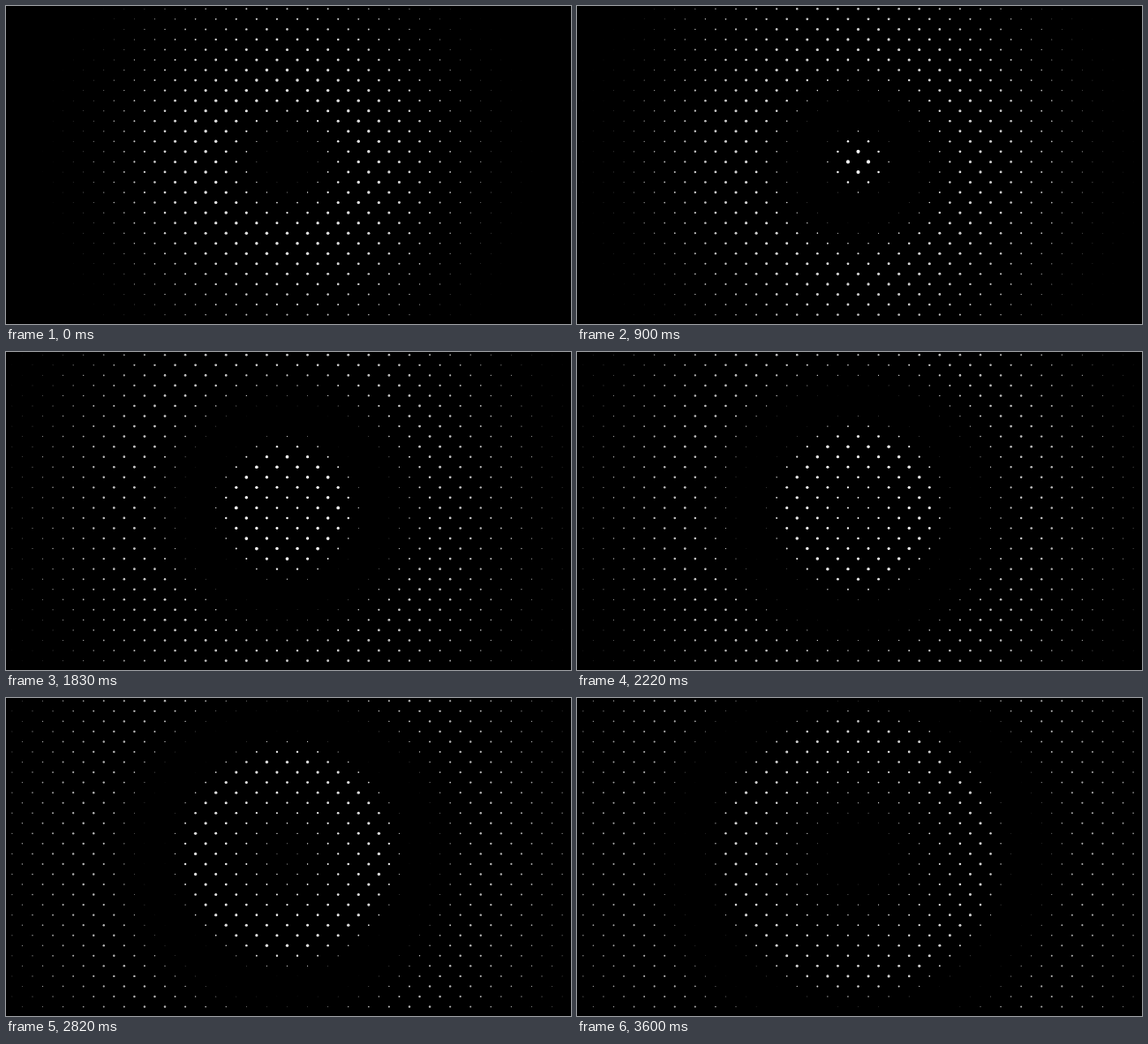
Write an HTML page with a canvas that moves like this. It is 640 by 360 pixels and loops after 3630 ms.

```html
<!DOCTYPE html>
<html lang="en">
<head>
<meta charset="utf-8">
<title>Dot ripple</title>
<style>
  html, body { margin: 0; width: 100%; height: 100%; overflow: hidden; background: #000; }
  canvas { display: block; }
</style>
</head>
<body>
<canvas id="stage" width="640" height="360"></canvas>
<script>
const ctx = document.getElementById('stage').getContext('2d');
const LOOP = 3630, STEP = 30;
const CX = 318.5, CY = 176.4, GAP = 11.54;
const COLS = 27, ROWS = 15;
const SPEED = 0.049; // px per ms

// Dots on a staggered lattice around the centre
const dots = [];
for (let j = -ROWS; j <= ROWS; j++) {
  for (let i = -COLS; i <= COLS; i++) {
    if ((i + j) % 2 === 0) continue;
    dots.push({ x: CX + i * GAP, y: CY + j * GAP, r: Math.hypot(i, j) * GAP });
  }
}

const line = (from, to, v) => Math.min(1, Math.max(0, (v - from) / (to - from)));
const smooth = x => x * x * (3 - 2 * x);

// Height of the two travelling rings at u, the distance relative to the wave
function wave(u) {
  if (u > 94) return smooth(line(320, 94, u));
  if (u > 8) return smooth(line(8, 94, u));
  if (u > -32) return line(4, -32, u);
  return line(-155, -32, u);
}

function draw(time) {
  ctx.globalAlpha = 1;
  ctx.fillStyle = '#000';
  ctx.fillRect(0, 0, 640, 360);
  ctx.fillStyle = '#fff';
  for (const { x, y, r } of dots) {
    const size = (2.08 - 0.0037 * r) * wave(r - SPEED * time);
    if (size < 0.08) continue;
    ctx.globalAlpha = 1 - r / 800;
    ctx.beginPath();
    ctx.arc(x, y, size, 0, Math.PI * 2);
    ctx.fill();
  }
}

const start = performance.now();
function tick() {
  const t = (performance.now() - start) % LOOP;
  draw(Math.floor(t / STEP) * STEP);
  requestAnimationFrame(tick);
}
tick();
</script>
</body>
</html>
```
